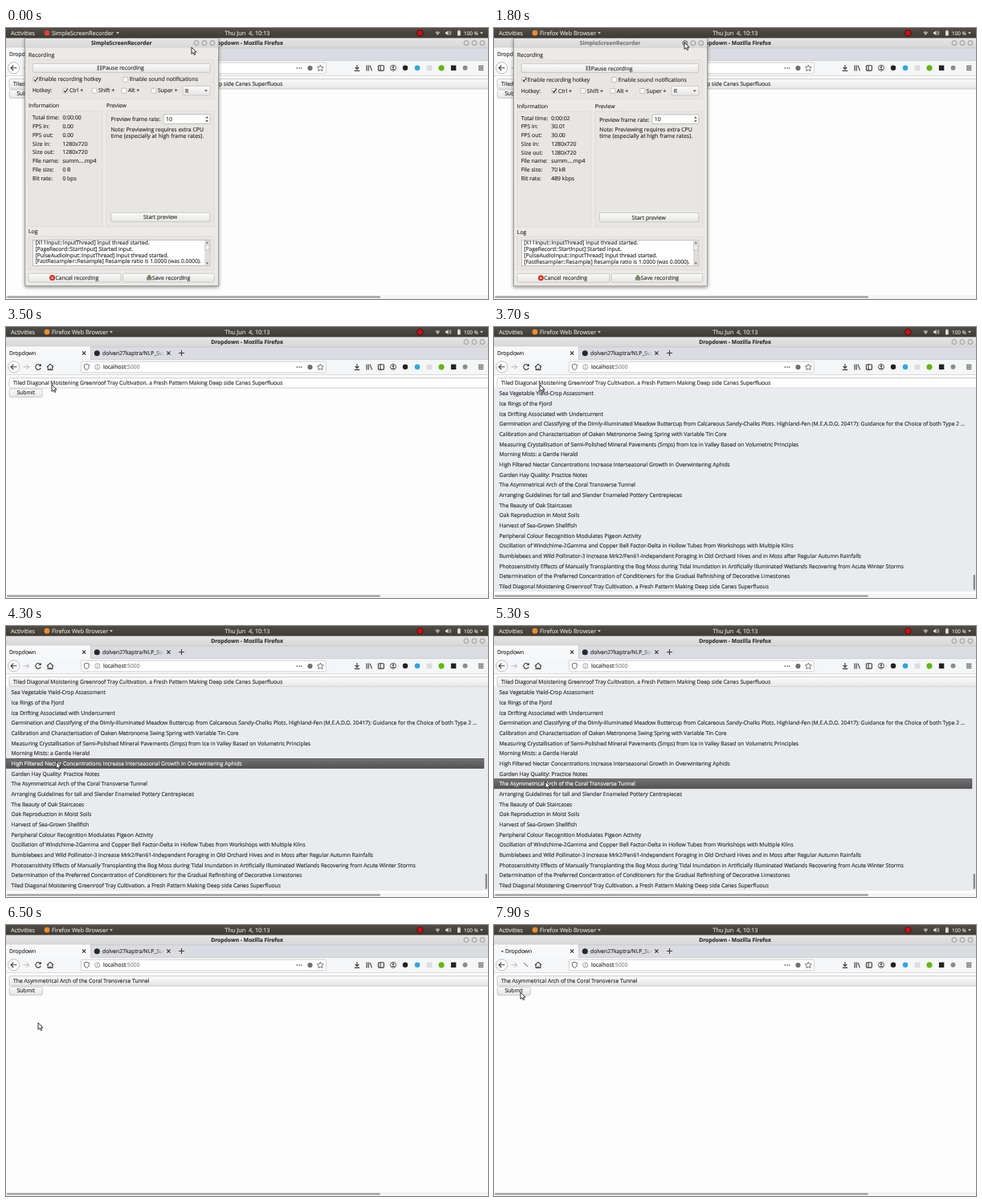
An HTML page that plays this animation: 600x338 px, repeating every 8000 ms.

```html
<!DOCTYPE html>
<html lang="en">
<head>
<meta charset="utf-8">
<title>Dropdown</title>
<style>
html, body { margin: 0; width: 100%; height: 100%; overflow: hidden; background: #fdfdfd; }
svg { display: block; }
#stage { width: 600px; height: 338px; }
text {
  font: 6.75px "Open Sans", "Noto Sans", sans-serif; text-rendering: geometricPrecision;
  color: #303030; fill: currentColor; stroke: currentColor; stroke-width: .16;
}
.bar { font-size: 7.3px; color: #dfdbd2; }
.small { font-size: 6.4px; }
.bold { font-weight: 700; }
.win { font-size: 6.9px; }
.line { fill: none; stroke: #3c3c3c; stroke-width: 1.1; }
.btn { fill: url(#button); stroke: #bdbab7; stroke-width: .7; }
.box { fill: #fff; stroke: #aaa7a4; stroke-width: .7; }
.group { fill: #e8e6e3; stroke: #dad7d4; stroke-width: .7; }
</style>
</head>
<body>
<svg id="stage" viewBox="0 0 600 338">
  <defs>
    <linearGradient id="panel" x2="0" y2="1"><stop stop-color="#514d46"/><stop offset="1" stop-color="#3d3a35"/></linearGradient>
    <linearGradient id="title" x2="0" y2="1"><stop stop-color="#e6e6e6"/><stop offset="1" stop-color="#d6d6d7"/></linearGradient>
    <linearGradient id="button" x2="0" y2="1"><stop stop-color="#fbfbfb"/><stop offset="1" stop-color="#e6e5e4"/></linearGradient>
    <linearGradient id="hover" x2="0" y2="1"><stop stop-color="#727272"/><stop offset="1" stop-color="#535353"/></linearGradient>
    <linearGradient id="fade"><stop stop-color="#dbdce1" stop-opacity="0"/><stop offset="1" stop-color="#dbdce1"/></linearGradient>
    <filter id="shadow" x="-10%" y="-10%" width="120%" height="120%"><feDropShadow dx="0" dy="1.5" stdDeviation="2.2" flood-opacity=".45"/></filter>
  </defs>
  <g id="browser"></g>
  <g id="page"></g>
  <g id="list"></g>
  <g id="recorder"></g>
  <g id="panelBar"></g>
  <path id="pointer" d="M0 0V8.4L2 6.6L3.4 9.5L4.8 8.9L3.5 6H6.1Z" fill="#fff" stroke="#1c1c1c" stroke-width=".9" stroke-linejoin="round"/>
</svg>
<script>
const LOOP = 8000, ROW = 12.66, LIST_TOP = 76.7;
const $ = id => document.getElementById(id);

const text = (x, y, s, cls = '', attrs = '') =>
  `<text x="${x}" y="${y + 2.4}" class="${cls}" ${attrs}>${s}</text>`;
const mid = (x, y, s, cls) => text(x, y, s, cls, 'text-anchor="middle"');
const rect = (x, y, w, h, attrs) => `<rect x="${x}" y="${y}" width="${w}" height="${h}" ${attrs}/>`;
const disc = (x, y, r, fill, attrs = '') => `<circle cx="${x}" cy="${y}" r="${r}" fill="${fill}" ${attrs}/>`;
const path = (d, attrs = 'class="line"') => `<path d="${d}" ${attrs}/>`;
const caret = (x, y, fill) => path(`M${x - 2} ${y - 1}h4l-2 2.4z`, `fill="${fill}"`);
const knobs = xs => xs.map(x => disc(x, 18.6, 3, '#d9d9d9', 'stroke="#8d8d8d" stroke-width=".8"')).join('');
const show = (id, on) => $(id).style.display = on ? '' : 'none';

const oldTitle = 'Tiled Diagonal Moistening Greenroof Tray Cultivation. a Fresh Pattern Making Deep side Canes Superfluous';
const newTitle = 'The Asymmetrical Arch of the Coral Transverse Tunnel';
const titles = [
  'Sea Vegetable Yield-Crop Assessment',
  'Ice Rings of the Fjord',
  'Ice Drifting Associated with Undercurrent',
  'Germination and Classifying of the Dimly-Illuminated Meadow Buttercup from Calcareous Sandy-Chalks Plots. Highland-Fen (M.E.A.D.O. 20417): Guidance for the Choice of both Type 2 …',
  'Calibration and Characterisation of Oaken Metronome Swing Spring with Variable Tin Core',
  'Measuring Crystallisation of Semi-Polished Mineral Pavements (Smps) from Ice in Valley Based on Volumetric Principles',
  'Morning Mists: a Gentle Herald',
  'High Filtered Nectar Concentrations Increase Interseasonal Growth in Overwintering Aphids',
  'Garden Hay Quality: Practice Notes',
  newTitle,
  'Arranging Guidelines for tall and Slender Enameled Pottery Centrepieces',
  'The Beauty of Oak Staircases',
  'Oak Reproduction in Moist Soils',
  'Harvest of Sea-Grown Shellfish',
  'Peripheral Colour Recognition Modulates Pigeon Activity',
  'Oscillation of Windchime-2Gamma and Copper Bell Factor-Delta in Hollow Tubes from Workshops with Multiple Kilns',
  'Bumblebees and Wild Pollinator-3 Increase Mrk2/Fen61-Independent Foraging in Old Orchard Hives and in Moss after Regular Autumn Rainfalls',
  'Photosensitivity Effects of Manually Transplanting the Bog Moss during Tidal Inundation in Artificially Illuminated Wetlands Recovering from Acute Winter Storms',
  'Determination of the Preferred Concentration of Conditioners for the Gradual Refinishing of Decorative Limestones',
  oldTitle
];

$('browser').innerHTML =
  rect(0, 0, 600, 338, 'fill="#fdfdfd"') +
  rect(0, 12, 600, 13, 'fill="url(#title)"') +
  mid(300, 18.6, 'Dropdown - Mozilla Firefox', 'bold') + knobs([573, 583, 593]) +
  rect(0, 25, 600, 15.5, 'fill="#dbdce1"') +
  path('M105.5 25v15.5H600M105 25h495', 'fill="none" stroke="#c3c4c9" stroke-width=".7"') +
  rect(0, 25, 105, 16, 'fill="#f7f8f9"') + rect(0, 24.6, 105, 1.4, 'fill="#fff"') +
  `<g id="tabLabel">${text(4, 32.6, 'Dropdown')}</g>` +
  rect(0, 32.2, 2.6, 1.4, 'id="spinner" fill="#555"') +
  path('M95 30.5l4.2 4.2m0-4.2l-4.2 4.2M200.3 30.5l4.2 4.2m0-4.2l-4.2 4.2M218.5 29v7m-3.5-3.5h7') +
  disc(113.3, 32.7, 3.5, '#24292e') +
  `<svg x="119" y="26" width="78" height="13" viewBox="119 26 78 13">${text(120, 32.6, 'dolven27kaptra/NLP_Summary')}</svg>` +
  rect(185, 27, 12, 12, 'fill="url(#fade)"') +
  rect(0, 41, 600, 18.5, 'fill="#f5f6f7"') + rect(0, 59.3, 600, .7, 'fill="#cfcfd2"') +
  disc(9.7, 49.8, 7.1, '#fff', 'stroke="#aeaeb2" stroke-width=".8"') +
  path('M13.5 49.8H6.2M9.3 46.6L6.1 49.8l3.2 3.2') +
  path('M21.5 49.8h7M25.5 46.6l3.2 3.2l-3.2 3.2', 'fill="none" stroke="#b4b4b8"') +
  `<g id="reload">${path('M42.6 47.7A3.3 3.3 0 1 0 43.2 51')}${path('M43.8 45.7v3.4h-3.4z', 'fill="#3c3c3c"')}</g>` +
  path('M37.3 47.2l5 5', 'id="slash" fill="none" stroke="#555"') +
  path('M51 50l4-3.8l4 3.8M52.2 49.6v3.8h5.6v-3.8M55 53.4v-2.2') +
  rect(93.4, 43.2, 305, 13.6, 'rx="1.5" fill="#fff" stroke="#c9c9cd" stroke-width=".8"') +
  path('M100.3 46.2l3 1v2.5q0 2.6-3 4q-3-1.4-3-4v-2.5z', 'fill="none" stroke="#555" stroke-width=".9"') +
  disc(113.8, 49.9, 3.1, 'none', 'stroke="#777" stroke-width=".7"') +
  path('M113.8 49.3v2.4M113.8 47.7v.8', 'stroke="#777" stroke-width=".8"') +
  text(121, 50, 'localhost<tspan style="color:#858585">:5000</tspan>') +
  [362.3, 365, 367.7].map(x => disc(x, 50, .85, '#555')).join('') +
  disc(378.5, 50, 3.1, '#707070') +
  path('M391.3 46l1.2 2.6l2.8.3l-2.1 1.9l.6 2.8l-2.5-1.4l-2.5 1.4l.6-2.8l-2.1-1.9l2.8-.3z', 'fill="none" stroke="#555" stroke-width=".8"') +
  path('M437 46v5M434.7 49l2.3 2.4l2.3-2.4M433.8 53.4h6.4') +
  path('M449 46.5v7M451.2 46.5v7M453 46.8l2.5 6.6') +
  rect(463.4, 46.7, 7, 6.4, 'rx="1" class="line"') + path('M466 46.7v6.4') +
  disc(482, 49.8, 3.5, 'none', 'stroke="#444" stroke-width=".9"') + disc(482, 48.8, 1.2, '#444') +
  path('M479.7 52q2.3-2.6 4.6 0z', 'fill="#444"') +
  disc(497, 49.8, 3.2, '#222') + disc(512, 49.8, 3.3, '#2ba7df') +
  rect(523.7, 46.6, 6.5, 6.5, 'fill="#dcdcdc"') + disc(542, 49.8, 3.6, '#62b70f') +
  rect(553.9, 46.6, 6.4, 6.4, 'fill="#222"') + disc(571.5, 49.8, 3, '#8b8b8b') +
  path('M588 47.5h6.4M588 49.9h6.4M588 52.3h6.4') +
  rect(0, 333, 600, 5, 'fill="#f4f4f4"') + rect(1, 334.4, 465, 2, 'rx="1" fill="#949494"');

$('page').innerHTML =
  rect(4, 63.6, 604, 12.4, 'id="select" class="btn" rx="1.5"') + text(9, 69.8, oldTitle, '', 'id="choice"') +
  rect(4.2, 77.2, 41, 10.2, 'id="submit" class="btn" rx="1.5"') + mid(24.6, 82, 'Submit');

$('list').innerHTML =
  rect(0, 76.2, 600, 254, 'fill="#e9ebef"') +
  rect(.3, 0, 594.6, ROW - .6, 'id="highlight" fill="url(#hover)" stroke="#4a4a4a" stroke-width=".7"') +
  titles.map((s, i) => text(6.5, 83 + i * ROW, s, 'row')).join('') +
  rect(596.7, 309, 2.2, 19, 'rx="1" fill="#858585"');

const check = (x, y, on) => rect(x, y - 3, 6, 6, 'class="box" rx=".8"') +
  (on ? path(`M${x + 1.2} ${y}l1.6 1.9l3-4.4`, 'fill="none" stroke="#222" stroke-width="1.1"') : '');
const info = ['Total time', 'FPS in', 'FPS out', 'Size in', 'Size out', 'File name', 'File size', 'Bit rate'];
const log = ['[X11Input::InputThread] Input thread started.', '[PageRecord::StartInput] Started input.',
  '[PulseAudioInput::InputThread] Input thread started.', '[FastResampler::Resample] Resample ratio is 1.0000 (was 0.0000).'];
const keys = [['Ctrl +', 71], ['Shift +', 107], ['Alt +', 144], ['Super +', 181]];

$('recorder').innerHTML =
  rect(23.8, 12.6, 240.8, 309, 'fill="#eceae7" stroke="#8f8c89" stroke-width=".8" filter="url(#shadow)"') +
  rect(24.2, 12.8, 240, 12, 'fill="url(#title)"') +
  mid(143.7, 18.6, 'SimpleScreenRecorder', 'bold') + knobs([237, 247, 257]) +
  disc(237, 18.6, 3, '#a9a9a9', 'id="minimise" stroke="#777" stroke-width=".8"') +
  text(28, 33.6, 'Recording', 'win') + rect(28, 39.8, 231, 48.4, 'class="group"') +
  rect(33.3, 44.4, 220.6, 11, 'class="btn" rx="1.5"') +
  path('M113.6 46.8h2.3v6.2h-2.3zM117 46.8h2.3v6.2h-2.3z', 'fill="#8a8a8a"') + text(120, 50, 'Pause recording', 'win') +
  check(33.8, 64.3, true) + text(41, 64, 'Enable recording hotkey', 'win') +
  check(145.8, 64.3) + text(154, 64, 'Enable sound notifications', 'win') +
  text(33, 78, 'Hotkey:', 'win') +
  keys.map(([s, x], i) => check(x, 78.2, !i) + text(x + 8, 78, s, 'win')).join('') +
  rect(220, 72.4, 34, 11.6, 'class="btn" rx="1.5"') + text(223, 78.2, 'R', 'win') + caret(249, 78.2, '#555') +
  text(28, 97, 'Information', 'win') + rect(28, 103.8, 92, 144, 'class="group"') +
  info.map((s, i) => text(33, 112 + i * 10.75, s + ':', 'win') + text(70.4, 112 + i * 10.75, '', 'win value')).join('') +
  text(125, 97, 'Preview', 'win') + rect(125, 103.8, 134, 144, 'class="group"') +
  text(130.4, 114, 'Preview frame rate:', 'win') + rect(196, 107.8, 58, 11.6, 'class="box" rx="1.2"') +
  text(199, 113.8, '10', 'win') + path('M248.3 112.5l1.8-2.4l1.8 2.4zM248.3 115l1.8 2.4l1.8-2.4z', 'fill="#555"') +
  text(130.4, 126.8, 'Note: Previewing requires extra CPU', 'win') + text(130.4, 134.6, 'time (especially at high frame rates).', 'win') +
  rect(130.6, 230.3, 123.3, 11.4, 'class="btn" rx="1.5"') + mid(192, 236, 'Start preview', 'win') +
  text(28, 254, 'Log', 'win') + rect(28, 260, 231, 41.5, 'class="group"') +
  rect(33.6, 264.6, 220.4, 32, 'class="box"') +
  `<svg x="34" y="265" width="213" height="31" viewBox="34 265 213 31">${log.map((s, i) => text(36.5, 267.4 + i * 7.85, s)).join('')}</svg>` +
  rect(247.2, 265, 6.4, 31.2, 'fill="#dfdddb"') + rect(247.8, 271, 5.2, 6, 'class="btn"') +
  path('M248.6 268.6l1.8-2.2l1.8 2.2zM248.6 292.4l1.8 2.2l1.8-2.2z', 'fill="#666"') +
  rect(28, 306.2, 115, 10.8, 'class="btn" rx="1.5"') + disc(57.6, 311.6, 3.5, '#d22b20') +
  path('M56.2 310.2l2.8 2.8m0-2.8l-2.8 2.8', 'stroke="#fff"') + text(61.5, 311.5, 'Cancel recording', 'win') +
  rect(145.5, 306.2, 113.5, 10.8, 'class="btn" rx="1.5"') +
  rect(175, 310.4, 6.6, 4.2, 'rx=".8" fill="#85898a"') + path('M176.8 308h3v2.2h1.6l-3.1 2.6l-3.1-2.6h1.6z', 'fill="#6b9140"') +
  text(182, 311.5, 'Save recording', 'win');

$('panelBar').innerHTML =
  rect(0, 0, 600, 12.5, 'fill="url(#panel)"') +
  text(6, 6.2, 'Activities', 'bar') + disc(51, 6.2, 3.4, '#f08a2c', 'id="appIcon"') +
  text(57, 6.2, '', 'bar', 'id="appName"') + `<g id="appCaret">${caret(0, 6.2, '#dfdbd2')}</g>` +
  mid(300.5, 6.2, 'Thu Jun\u00a0\u00a04, 10:13', 'bar') +
  disc(515.5, 6.3, 3.8, '#d80d12', 'stroke="#3a1512" stroke-width=".9"') +
  path('M537.3 9.2l-3-3.6q3-2.6 6 0z', 'fill="#a9a59c"') +
  path('M547 5h1.5l2-1.8v6l-2-1.8h-1.5z', 'fill="#dfdbd2"') +
  path('M551.7 4.3q1.3 2 0 3.9M553 3.4q2 2.8 0 5.6', 'fill="none" stroke="#dfdbd2" stroke-width=".7"') +
  rect(562, 3.4, 3.8, 6.2, 'rx=".5" fill="#dfdbd2"') + rect(563, 2.6, 1.8, 1, 'fill="#dfdbd2"') +
  text(570, 6.3, '100 %', 'bar small') + caret(592, 6.2, '#dfdbd2');

// time, x, y of the pointer tip
const route = [
  [0, 231, 24], [400, 232, 24], [1000, 236, 19], [1400, 237, 18], [1900, 237, 18], [2000, 235, 18],
  [2200, 190, 30], [2500, 85, 63], [2700, 57, 72], [3900, 57, 72], [4000, 58, 86], [4200, 61, 145],
  [4400, 64, 194], [5900, 64, 194], [6200, 50, 142], [6400, 42, 124], [6500, 40, 122], [6800, 35, 109],
  [7200, 33, 84], [8000, 33, 84]
];
function pointerAt(t) {
  const i = route.findIndex(p => p[0] > t);
  const [t0, x0, y0] = route[i - 1], [t1, x1, y1] = route[i];
  const k = (t - t0) / (t1 - t0);
  return [x0 + (x1 - x0) * k, y0 + (y1 - y0) * k];
}

const size = '1280x720', file = 'summ….mp4';
const stats = [
  ['0:00:00', '0.00', '0.00', size, size, file, '0 B', '0 bps'],
  ['0:00:01', '30.01', '30.00', size, size, file, '35 kB', '287 kbps'],
  ['0:00:02', '30.01', '30.00', size, size, file, '70 kB', '489 kbps']
];
const values = document.querySelectorAll('.value'), rows = document.querySelectorAll('.row');
const winTitle = $('recorder').querySelector('.bold');

function render(t) {
  const [x, y] = pointerAt(t);
  $('pointer').setAttribute('transform', `translate(${x} ${y})`);

  const unfocused = t >= 1700, closing = t >= 1900;
  $('appName').textContent = unfocused ? 'Firefox Web Browser' : 'SimpleScreenRecorder';
  $('appIcon').style.fill = unfocused ? '#f08a2c' : '#d8433a';
  $('appCaret').setAttribute('transform', `translate(${unfocused ? 131 : 139} 0)`);
  winTitle.style.color = unfocused ? '#777' : '';
  show('recorder', t < 2000);
  show('minimise', t >= 1400);
  $('recorder').setAttribute('opacity', closing ? .4 : 1);
  $('recorder').setAttribute('transform', closing ? 'translate(12 12) scale(.93)' : unfocused ? 'translate(.8 .2)' : '');
  const tick = t < 600 ? 0 : t < 1600 ? 1 : 2;
  values.forEach((v, i) => v.textContent = stats[tick][i]);

  const open = t >= 3700 && t < 5500;
  const row = open && t >= 4000 ? Math.floor((y - LIST_TOP) / ROW) : -1;
  show('list', open);
  show('highlight', row >= 0);
  $('highlight').setAttribute('y', LIST_TOP + row * ROW + .1);
  rows.forEach((r, i) => r.style.color = i === row ? '#fff' : '');
  $('select').style.fill = t >= 3500 && t < 3800 ? '#fefefe' : '';
  $('choice').textContent = t < 5500 ? oldTitle : newTitle;

  const loading = t >= 7700;
  $('submit').style.fill = t >= 7500 && !loading ? '#d3d3d3' : '';
  show('spinner', loading);
  show('slash', loading);
  show('reload', !loading);
  $('spinner').setAttribute('x', 5 + (t - 7700) / 50);
  $('tabLabel').setAttribute('transform', loading ? 'translate(10 0)' : '');
}

function frame() {
  render(Math.floor(performance.now() % LOOP / 100) * 100);
  requestAnimationFrame(frame);
}
frame();
</script>
</body>
</html>
```
